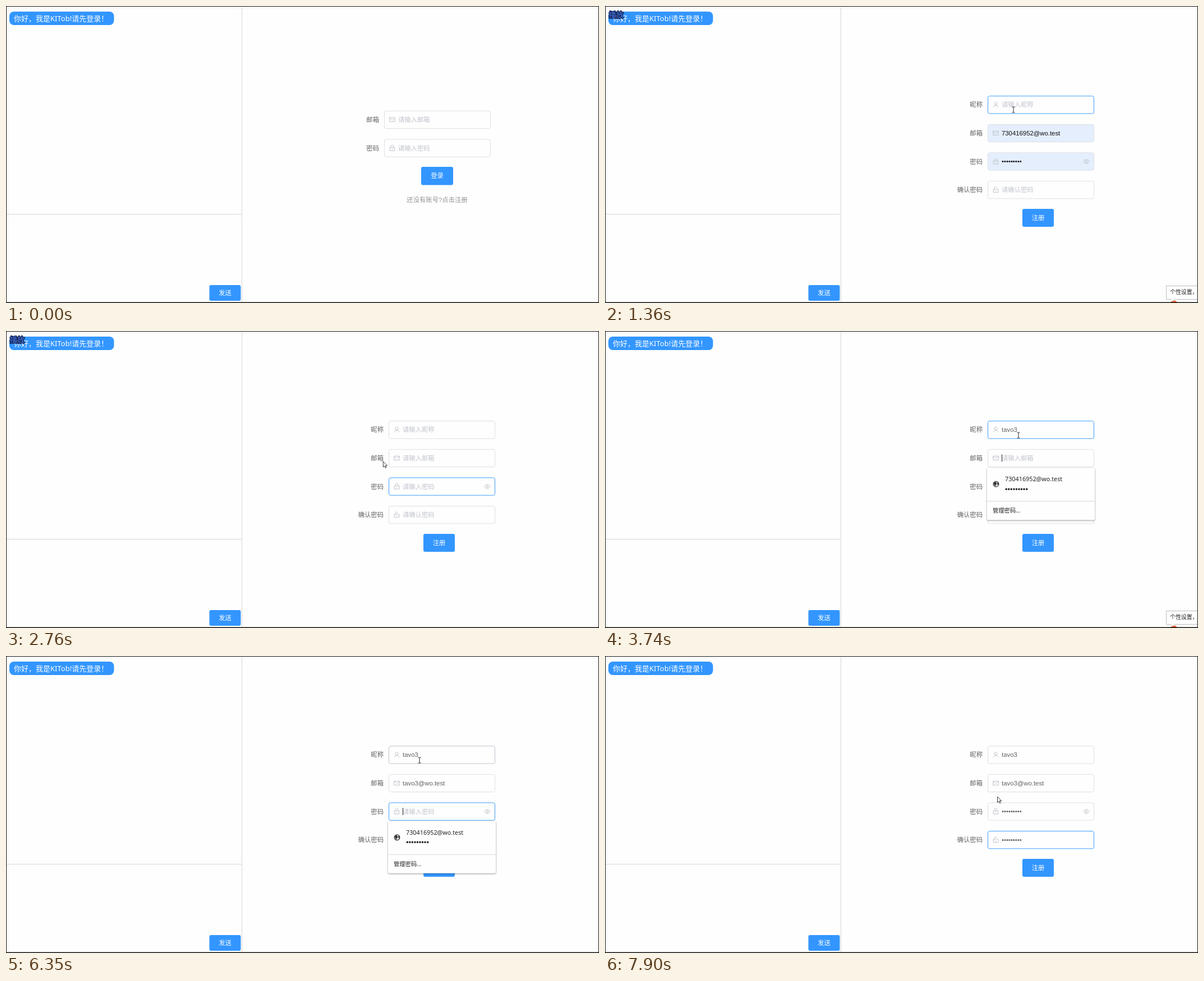
An HTML page for the animation above (8000 ms loop, 1057 by 530 pixels).

```html
<!DOCTYPE html>
<html lang="zh-CN">
<head>
<meta charset="utf-8">
<title>注册</title>
<style>
  html, body { margin: 0; width: 100%; height: 100%; overflow: hidden; background: #fefefe; }
  svg { display: block; width: 1057px; height: 530px; }
  text { font: 11.35px "Liberation Sans", "Noto Sans CJK SC", "Noto Sans CJK", sans-serif; fill: #606266; white-space: pre; }
  .label { text-anchor: end; }
  .hint { fill: #c0c4cc; }
  .box { fill: #fefefe; stroke: #dcdfe6; }
  .icon { fill: none; stroke: #b9bdc5; stroke-width: .9; }
  .button rect { fill: #3396ff; }
  .button text { fill: #fff; text-anchor: middle; }
  .bubble { font: 500 13px "Noto Sans", "Noto Sans CJK SC", "Noto Sans CJK", sans-serif; fill: #fff; }
  .osd { font: bold 13px "Noto Sans CJK SC", "Noto Sans CJK", sans-serif; fill: #3d66c4; stroke: #0c1640; stroke-width: 2px; paint-order: stroke; }
  .line { fill: none; stroke: #d6d6d6; }
  .menu { filter: drop-shadow(0 1px 1.5px #0006); }
  .menu text { font: 10.8px "Noto Sans", "Noto Sans CJK SC", "Noto Sans CJK", sans-serif; fill: #222; }
  .menu .dots { font: 13px "Liberation Sans", sans-serif; }
  .menu .manage { font-size: 10.3px; }
  .tip text { font-size: 9.9px; fill: #222; }
</style>
</head>
<body>
<svg viewBox="0 0 1057 530">
  <defs>
    <path id="user" d="M-2.6-2a2.6 2.6 0 1 0 5.2 0a2.6 2.6 0 1 0-5.2 0M-4.4 4.6C-4 .2 4 .2 4.4 4.6"/>
    <path id="mail" d="M-4.8-3.6h9.6v7.2h-9.6zM-4.8-3L0 .7 4.8-3"/>
    <path id="lock" d="M-4.3-1h8.6v5.6h-8.6zM-2.5-1v-1.6a2.5 2.5 0 0 1 5 0V-1M0 1v1.8"/>
    <path id="unlock" d="M-4.3-1h8.6v5.6h-8.6zM-2.5-1v-1.6a2.5 2.5 0 0 1 4.8-1M0 1v1.8"/>
    <path id="eye" d="M-5.4 0Q0-7.4 5.4 0Q0 7.4-5.4 0zM-1.7 0a1.7 1.7 0 1 0 3.4 0a1.7 1.7 0 1 0-3.4 0"/>
  </defs>

  <rect width="1057" height="530" fill="#fefefe"/>
  <path class="line" d="M420.5 1V528M1 371.5H420"/>
  <rect x="6" y="10" width="186.5" height="24" rx="8" fill="#3396ff"/>
  <text class="bubble" x="14" y="27">你好，我是KITob!请先登录！</text>
  <text class="osd" id="osd" x="7" y="20">播放</text>
  <g id="send"></g>

  <g id="login">
    <text x="768.5" y="350" text-anchor="middle" style="fill:#909399">还没有账号?点击注册</text>
  </g>
  <g id="register"></g>

  <g class="menu" id="menu">
    <rect x="681" y="0" width="192" height="93" rx="2" fill="#fefefe"/>
    <path class="line" d="M681 59.5H873"/>
    <circle cx="697" cy="29" r="4.9" fill="#fff" stroke="#333" stroke-width="1.2"/>
    <path d="M693 27q4-4 5 0t-2 3l1 3q-4-1-4-6M699 26q3 0 2.5 4l-2 1z" fill="#333"/>
    <text x="713" y="24">730416952@wo.test</text>
    <text class="dots" x="713" y="42.5">•••••••••</text>
    <text class="manage" x="691" y="80">管理密码...</text>
  </g>

  <g class="tip" id="tip">
    <circle id="badge" cx="1014" cy="532" r="6.5" fill="#ef6530"/>
    <path d="M1000.5 499.5H1060V523.5H1016L1012 527 1008 523.5H1000.5Z" fill="#fefefe" stroke="#bdbdbd"/>
    <text x="1007" y="514">个性设置，</text>
  </g>

  <rect id="caret" width="1" height="13" fill="#222"/>
  <path id="beam" d="M-2.5-5H-.8L0-4.4.8-5H2.5M0-4.4V4.4M-2.5 5H-.8L0 4.4.8 5H2.5" fill="none" stroke="#222"/>
  <path id="arrow" d="M0 0V10.3L2.4 8.1 4 11.6 5.6 10.9 4.1 7.5H7.2Z" fill="#fff" stroke="#222" stroke-width=".9"/>

  <path d="M0 .5H1057M.5 0V530M1056.5 0V530" stroke="#111"/>
  <path d="M0 529.2H1057" stroke="#111" stroke-width="1.6"/>
</svg>

<script>
const LOOP = 8000;
const $ = id => document.getElementById(id);
const show = (node, on) => { node.style.display = on ? '' : 'none'; };
const within = (t, from, to) => t >= from && t < to;

function add(parent, tag, attrs, text = '') {
  const node = document.createElementNS('http://www.w3.org/2000/svg', tag);
  for (const key in attrs) node.setAttribute(key, attrs[key]);
  node.textContent = text;
  parent.append(node);
  return node;
}

function button(parent, x, y, w, h, label) {
  const g = add(parent, 'g', { class: 'button' });
  add(g, 'rect', { x, y, width: w, height: h, rx: 3 });
  add(g, 'text', { x: x + w / 2, y: y + h / 2 + 4.2 }, label);
}

function field(parent, x, y, label, icon, hint) {
  const mid = y + 16;
  add(parent, 'text', { class: 'label', x: x - 9, y: mid + 4.2 }, label);
  const box = add(parent, 'rect', { class: 'box', x: x + .5, y: y + .5, width: 189, height: 31.3, rx: 3 });
  add(parent, 'use', { class: 'icon', href: '#' + icon, transform: `translate(${x + 14.5} ${mid})` });
  const hintText = add(parent, 'text', { class: 'hint', x: x + 25, y: mid + 4.2 }, hint);
  const value = add(parent, 'text', { x: x + 25, y: mid + 4 });
  return { x, y, mid, box, hintText, value };
}

button($('send'), 362.5, 498, 56, 28, '发送');
field($('login'), 674, 186.7, '邮箱', 'mail', '请输入邮箱');
field($('login'), 674, 237.5, '密码', 'lock', '请输入密码');
button($('login'), 740, 287, 57, 32.5, '登录');

const rows = [
  ['昵称', 'user', '请输入昵称'],
  ['邮箱', 'mail', '请输入邮箱'],
  ['密码', 'lock', '请输入密码'],
  ['确认密码', 'unlock', '请确认密码']
];
const fields = rows.map((row, i) => field($('register'), 682, 160.2 + 50.6 * i, ...row));
button($('register'), 744, 362, 56, 32, '注册');
const eye = add($('register'), 'use', { class: 'icon', href: '#eye', transform: 'translate(858 277.5)' });

// Key press times for each field
const every = (start, step, n) => Array.from({ length: n }, (_, i) => start + i * step);
const keys = [
  every(3080, 100, 5),
  [3940, 4040, 4140, 4240, 4540, 4740, 4840, 4920, 5000, 5200, 5200, 5200, 5200],
  every(6550, 32, 9),
  every(7060, 35, 9)
];
const words = ['tavo3', 'tavo3@wo.test', '•'.repeat(9), '•'.repeat(9)];
const prefilled = [null, ['730416952@wo.test', 1960], ['•'.repeat(9), 2660], null];

const focusSpans = [
  [[1100, 1560], [2960, 3800]],
  [[1560, 2060], [3800, 6000]],
  [[2360, 2960], [6000, 6860]],
  [[6860, LOOP]]
];
const carets = [[3000, 3720], [3720, 6000], [6000, 6860], [6860, LOOP]];
const menus = [null, [3720, 3940], [6000, 6550], [6860, 7060]];

const path = [
  [220, 722, 385], [420, 708, 372], [660, 735, 350], [860, 735, 350], [1060, 728, 185],
  [1360, 728, 185], [1560, 815, 228], [1860, 588, 230], [1960, 600, 228], [2160, 659, 221],
  [2260, 690, 245], [2360, 748, 277], [2560, 632, 262], [2660, 640, 256], [2960, 737, 186],
  [7460, 737, 186], [7660, 722, 280], [7860, 699.5, 251]
];

function cursorAt(t) {
  const i = path.findIndex(p => p[0] > t);
  if (i < 0) return path.at(-1).slice(1);
  if (!i) return path[0].slice(1);
  const [a, b] = [path[i - 1], path[i]];
  const k = (t - a[0]) / (b[0] - a[0]);
  return [1, 2].map(n => a[n] + (b[n] - a[n]) * k);
}

function drawField(f, i, t, [cx, cy]) {
  const old = prefilled[i] && t < prefilled[i][1];
  const text = old ? prefilled[i][0] : words[i].slice(0, keys[i].filter(k => k <= t).length);
  const focused = focusSpans[i].some(s => within(t, ...s));
  const hovered = within(cx, f.x, f.x + 190) && within(cy, f.y, f.y + 32);
  f.value.textContent = text;
  f.value.style.fill = old ? '#111' : '';
  show(f.hintText, !text);
  f.box.style.fill = old ? '#e5eefc' : '';
  f.box.style.stroke = focused ? '#409eff' : hovered ? '#c0c4cc' : '';
  if (i === 2) show(eye, text || focused);
  return hovered;
}

function drawCaret(t) {
  const i = carets.findIndex(c => within(t, ...c));
  show($('caret'), false);
  if (i < 0) return;
  const last = Math.max(carets[i][0], ...keys[i].filter(k => k <= t));
  if ((t - last) % 1060 >= 530) return;
  const f = fields[i];
  show($('caret'), true);
  const width = f.value.textContent ? f.value.getComputedTextLength() : 0;
  $('caret').setAttribute('x', f.x + 25 + width);
  $('caret').setAttribute('y', f.mid - 6.5);
}

function drawCursor(t, [x, y], overInput) {
  show($('beam'), t >= 220 && overInput);
  show($('arrow'), t >= 220 && !overInput);
  for (const id of ['beam', 'arrow']) $(id).setAttribute('transform', `translate(${x} ${y})`);
}

function render(t) {
  const registering = t >= 760;
  show($('login'), !registering);
  show($('register'), registering);
  show($('osd'), within(t, 220, 3380));
  show($('tip'), within(t, 1160, 1560) || within(t, 2860, 5800));
  $('badge').setAttribute('cx', within(t, 5400, 5800) ? 1016 : 1014);

  // The pointer advances in tenths of a second
  const pointer = cursorAt(Math.floor((t - 60) / 100) * 100 + 60);
  const hovers = fields.map((f, i) => drawField(f, i, t, pointer));
  drawCursor(t, pointer, registering && hovers.includes(true));
  drawCaret(t);

  const open = menus.findIndex(m => m && within(t, ...m));
  show($('menu'), open >= 0);
  if (open >= 0) $('menu').setAttribute('transform', `translate(0 ${fields[open].y + 33.4})`);
}

const start = performance.now();
function tick() {
  render((performance.now() - start) % LOOP);
  requestAnimationFrame(tick);
}
tick();
</script>
</body>
</html>
```
